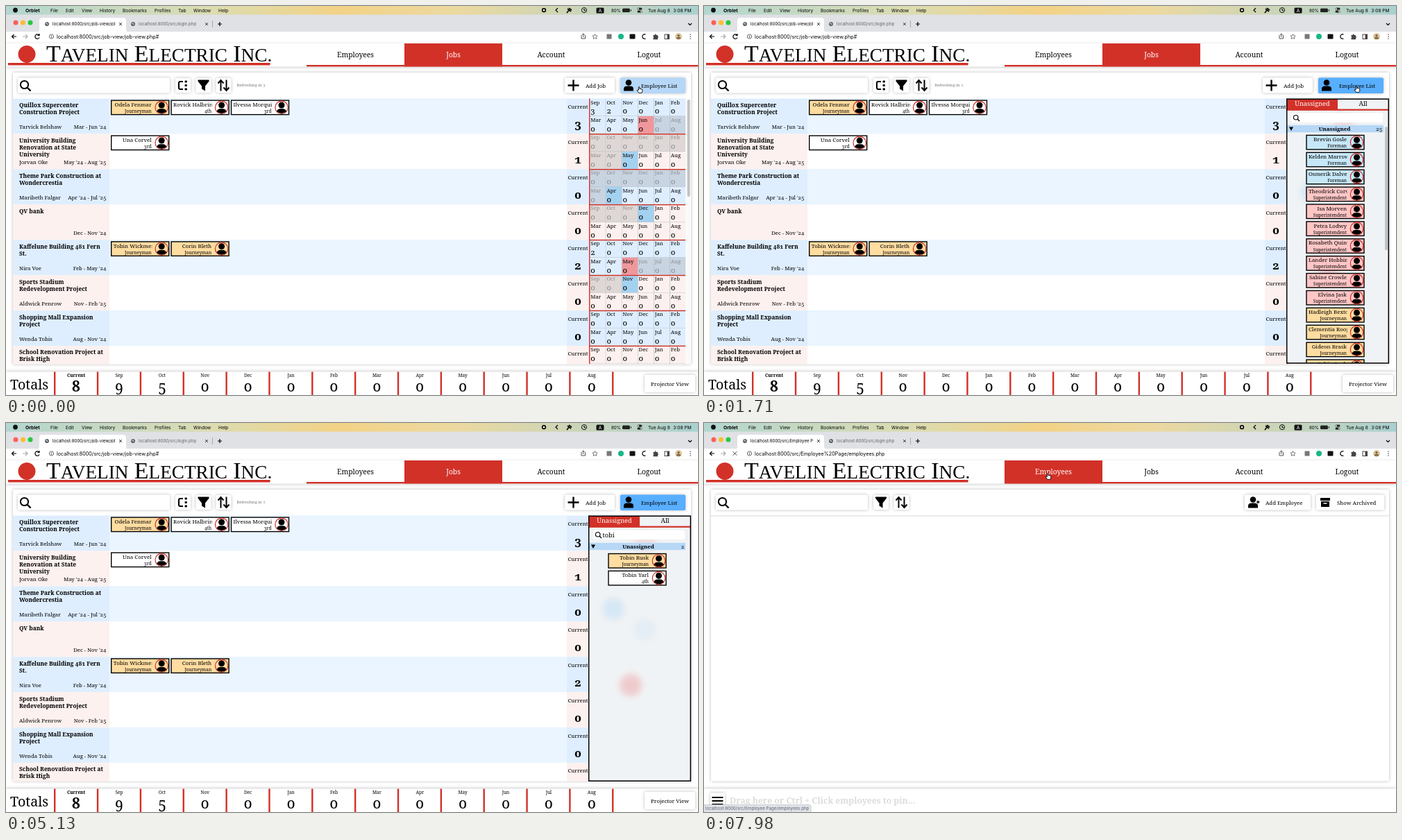
Recreate the animation shown at these times as an HTML page. Size 997 by 561 pixels, loop 8 s.

```html
<!DOCTYPE html>
<html lang="en">
<head>
<meta charset="utf-8">
<title>Job board</title>
<style>
html, body { margin: 0; width: 100%; height: 100%; overflow: hidden; background: #fff; }
svg { display: block; }
#stage { width: 100vw; height: 100vh; }
text { font-family: "Noto Serif", serif; font-variant-numeric: oldstyle-nums; white-space: pre; }
.sans { font-family: Inter, sans-serif; font-variant-numeric: normal; }
.title { font-family: "Liberation Serif", serif; }
.bold { font-weight: 700; }
.mid { text-anchor: middle; }
.end { text-anchor: end; }
.white { fill: #fff; }
.dim { fill: #8b8f93; }
.soft { fill: #5f6368; }
.pale { fill: #dcdcdc; }
.lift { filter: drop-shadow(0 0 2px #0004); }
.line { fill: none; stroke: #000; stroke-width: 1.2; }
</style>
</head>
<body>
<svg id="stage" viewBox="0 0 997 561"></svg>
<script>
const LOOP = 8000;
const RED = '#d23128';
const MONTHS = 'Sep Oct Nov Dec Jan Feb Mar Apr May Jun Jul Aug'.split(' ');
const ROLES = ['Foreman', 'Superintendent', 'Journeyman', '4th', '3rd'];
const ROLE_FILL = { Foreman: '#c6e7f7', Superintendent: '#ffc6c6', Journeyman: '#ffdca0' };
const ROW = 50.95, ROWS_TOP = 133.5;

const JOBS = [
  { title: ['Quillox Supercenter', 'Construction Project'], lead: 'Tarvick Belshaw', span: "Mar - Jun '24", last: 9, need: [3, 2],
    crew: [['Odela Fenmar', 'Journeyman'], ['Rovick Halbrine', '4th'], ['Ilvessa Morquin', '3rd']] },
  { title: ['University Building', 'Renovation at State', 'University'], lead: 'Jorvan Oke', span: "May '24 - Aug '25", first: 8,
    crew: [['Una Corvel', '3rd']] },
  { title: ['Theme Park Construction at', 'Wondercrestia'], lead: 'Maribeth Falgar', span: "Apr '24 - Jul '25", first: 7 },
  { title: ['QV bank'], lead: '', span: "Dec - Nov '24", first: 3 },
  { title: ['Kaffelune Building 481 Fern', 'St.'], lead: 'Nira Voe', span: "Feb - May '24", last: 8, need: [2],
    crew: [['Tobin Wickmere', 'Journeyman'], ['Corin Bleth', 'Journeyman']] },
  { title: ['Sports Stadium', 'Redevelopment Project'], lead: 'Aldwick Penrow', span: "Nov - Feb '25", first: 2 },
  { title: ['Shopping Mall Expansion', 'Project'], lead: 'Wenda Tobis', span: "Aug - Nov '24" },
  { title: ['School Renovation Project at', 'Brisk High'], lead: '', span: '' }
];
const FREE = [
  ['Foreman', 'Brevin Gosle,Kelden Marrow,Osmerik Dalvey'],
  ['Superintendent', 'Theodrick Corvins,Isa Morven,Petra Lodwy,Rosabeth Quintlow,Lander Hobbin,Sabine Crowle,Elvina Jask'],
  ['Journeyman', 'Hadleigh Bexton,Clementia Roop,Gideon Brask,Tobin Rusk,Merla Sandry,Orrin Fosk'],
  ['4th', 'Tobin Yarl,Ansel Dunrow,Britta Keel,Hollis Marn,Linnet Gorse'],
  ['3rd', 'Perrin Stoke,Selda Warrick,Tamsy Orle,Yorick Plend']
].flatMap(([role, names]) => names.split(',').map(name => [name, role]));
const ACTIVE = [...FREE, ...JOBS.flatMap(job => job.crew || [])].sort((a, b) =>
  ROLES.indexOf(a[1]) - ROLES.indexOf(b[1]) || a[0].localeCompare(b[0]));
const INACTIVE = [['Wenda Tobis', 'Superintendent']];

const text = (x, y, s, size, cls = '') => `<text x="${x}" y="${y}" font-size="${size}" class="${cls}">${s}</text>`;
const rect = (x, y, w, h, fill, more = '') => `<rect x="${x}" y="${y}" width="${w}" height="${h}" fill="${fill}" ${more}/>`;
const circle = (x, y, r, fill, more = '') => `<circle cx="${x}" cy="${y}" r="${r}" fill="${fill}" ${more}/>`;
const path = (d, more = 'class="line"') => `<path d="${d}" ${more}/>`;
const at = (x, y, body, scale = 1) => `<g transform="translate(${x} ${y}) scale(${scale})">${body}</g>`;
const group = (id, body, more = '') => `<g id="${id}" ${more}>${body}</g>`;
const box = (x, y, w, h, fill = '#fff') => rect(x, y, w, h, fill, 'rx="2" class="lift"');
const each = (list, draw) => list.map(draw).join('');

const ICONS = {
  search: circle(-1, -1, 5.6, 'none', 'stroke="#000" stroke-width="2"') + path('M3 3L8 8', 'stroke="#000" stroke-width="2.4"'),
  filter: path('M-8 -8H8V-6L2.5 1V8L-2.5 5V1L-8 -6Z', ''),
  sort: path('M-4 8V-7M-8 -3L-4 -7.5L0 -3M4 -8V7M0 3L4 7.5L8 3', 'fill="none" stroke="#000" stroke-width="2"'),
  tree: path('M0 -5.5H-4Q-6 -5.5 -6 -3.5V3.5Q-6 5.5 -4 5.5H0', 'fill="none" stroke="#000" stroke-width="2"') +
    each([-5.5, 0, 5.5], y => rect(2.5, y - 1.6, 3.4, 3.2, '#000', 'rx="1"')),
  plus: path('M-8 0H8M0 -8V8', 'stroke="#000" stroke-width="2.4"'),
  person: circle(0, -4, 4.3, '#000') + path('M-7 8V5Q-7 1 -2 1H2Q7 1 7 5V8Z', ''),
  archive: rect(-7, -6, 14, 4, '#000') + path('M-6 -1H6V7H-6Z', '') + rect(-2.5, 1, 5, 1.5, '#fff')
};
const icon = (name, x, y, scale) => at(x, y, ICONS[name], scale);
const iconButton = (name, x) => box(x - 11, 104, 22, 21) + icon(name, x, 114.5);

const pen = document.createElement('canvas').getContext('2d');
pen.font = '7.9px "Noto Serif", serif';

function card(x, y, [name, role]) {
  const fits = pen.measureText(name).width <= 56;
  return rect(x, y, 83, 20.5, ROLE_FILL[role] || '#fff', 'stroke="#000" stroke-width="1.4"') +
    `<svg x="${x + 2}" y="${y}" width="56.5" height="21">` +
    text(fits ? 56 : 1, 8.7, name, 7.9, fits ? 'end' : '') + text(56, 17.8, role, 6.5, 'end') + '</svg>' +
    at(x + 72.5, y + 10.2, circle(0, 0, 9.2, 'none', `stroke="${RED}" stroke-width="1.2"`) + circle(0, -3.3, 4.5, '#000') +
      path('M-7 5.8Q-6 2 -2 2H2Q6 2 7 5.8Q0 11.5 -7 5.8Z', ''));
}

function monthCell(job, i, top, base) {
  const x = 841.3 + (i % 6) * 23.1, y = top + (i > 5 ? 25.5 : 0);
  const { first = -1, last = 12, need = [] } = job;
  const off = i < first || i > last;
  const fill = i === first ? '#a3d1f0' : i === last ? '#ef979b' : base;
  return rect(x, y, 23.1, 25.5, fill) + (off ? rect(x, y, 23.1, 25.5, '#808080', 'opacity=".24"') : '') +
    rect(x + 22.5, y, 0.8, 25.5, '#b0b7bf') + rect(x, y + 25, 23.1, 0.6, '#b7bec6') +
    text(x + 1, y + 8, MONTHS[i], 7.7, off ? 'dim' : '') + text(x + 1, y + 21.8, need[i] || 0, 11.3, off ? 'dim' : '');
}

function jobRow(job, i) {
  const y = ROWS_TOP + i * ROW, blue = i % 2 === 0, side = blue ? '#deeeff' : '#fcf1ef';
  const crew = job.crew || [];
  return rect(10, y, 969, 51, side) + rect(149, y, 659, 51, blue ? '#eaf5ff' : '#fff') +
    each(job.title, (line, k) => text(19, y + 12.3 + k * 10, line, 8.3, 'bold')) +
    text(19, y + 43.6, job.lead, 7.8) + text(144.5, y + 43.6, job.span, 7.7, 'end') +
    each(crew, (person, k) => card(151.7 + k * 86.4, y + 2.6, person)) +
    text(824, y + 14.3, 'Current', 7.8, 'mid') + text(824, y + 42.3, crew.length, 17, 'mid bold') +
    each(MONTHS, (_, k) => monthCell(job, k, y, side)) + (i ? rect(841, y - 0.4, 138, 1.4, RED) : '');
}

function browser() {
  const menu = [['File', 64], ['Edit', 86], ['View', 109], ['History', 135], ['Bookmarks', 168], ['Profiles', 214], ['Tab', 248], ['Window', 270], ['Help', 306]];
  const globe = (x) => circle(x, 26, 3, '#5f6368') + path(`M${x - 2} 25h2l1 2`, 'fill="none" stroke="#fff" stroke-width=".8"');
  const cross = (x, y, r) => path(`M${x - r} ${y - r}l${2 * r} ${2 * r}m0 ${-2 * r}l${-2 * r} ${2 * r}`, 'stroke="#444" stroke-width="1"');
  return rect(0, 0, 997, 13, 'url(#sky)') + circle(13.5, 6, 3.4, '#111') + text(28, 8.5, 'Orblet', 6.8, 'sans bold') +
    each(menu, ([s, x]) => text(x, 8.5, s, 6.6, 'sans')) +
    circle(775, 6, 3.2, '#111') + rect(773.8, 4.8, 2.4, 2.4, '#fff') + path('M795 3l-3 3l3 3') +
    path('M808 10l3 -4M809 4l5 4M811 3l4 3', 'stroke="#111" stroke-width="1.8"') +
    circle(833, 6, 3.6, 'none', 'stroke="#111"') + path('M833 4v2l2 1') +
    rect(850.5, 2.5, 11, 8, '#111', 'rx="1.5"') + text(856, 9, 'A', 6.6, 'sans mid white') +
    text(872, 8.5, '80%', 6.2, 'sans') + rect(888, 3.5, 11, 5.5, '#222', 'rx="1.5"') + rect(900, 5, 1, 2.5, '#222') +
    each([4, 8], y => rect(909.5, y - 1.5, 7, 3, '#222', 'rx="1.5"') + circle(y === 4 ? 911 : 915, y, 0.9, '#fff')) +
    text(925, 8.5, 'Tue Aug 8', 6.6, 'sans') + text(987.5, 8.5, '3:08 PM', 6.6, 'sans end') +
    rect(0, 12.5, 997, 25, '#dfe1e5') + each(['#ff5f57', '#febc2e', '#28c840'], (c, i) => circle(14 + i * 10.5, 24, 3.5, c)) +
    path('M44 38Q48 38 48 33V21Q48 17 52 17H169Q173 17 173 21V33Q173 38 177 38Z', 'fill="#fff"') +
    globe(59) + globe(183) + `<svg x="67" y="18" width="90" height="16"><text id="tab" y="10.3" font-size="6.1" class="sans"></text></svg>` +
    text(191, 28.3, 'localhost:8000/src/login.php', 6.1, 'sans soft') + cross(165, 26, 2) + cross(289, 26, 2) +
    rect(297, 21, 0.8, 10, '#999') + path('M305 26h6M308 23v6') + path('M983 25l2.5 2.5l2.5 -2.5') +
    rect(0, 37, 997, 17, '#fff') + path('M15 44H8.5M11.5 41l-3 3l3 3') +
    path('M24 44h7M28 41l3 3l-3 3', 'fill="none" stroke="#aaa" stroke-width="1.2"') +
    group('reload', path('M47.5 42A3.2 3.2 0 1 0 48 45.5M48 40v2.5h-2.5')) + group('stop', cross(44.5, 44, 2.8)) +
    circle(65.5, 44, 3.1, 'none', 'stroke="#555" stroke-width=".9"') + path('M65.5 43.5v2.3M65.5 42v.7', 'stroke="#555"') +
    '<text id="url" x="73" y="46.7" font-size="7.2" class="sans"></text>' +
    path('M829 42v5h5.5v-5M831.8 45v-5M830 41.8l1.8 -2l1.8 2', 'fill="none" stroke="#555"') +
    path('M848.5 40.5l1.1 2.3l2.5 .3l-1.8 1.7l.5 2.5l-2.3 -1.2l-2.3 1.2l.5 -2.5l-1.8 -1.7l2.5 -.3Z', 'fill="none" stroke="#555" stroke-width=".8"') +
    rect(865.5, 40.5, 7, 7, '#777') + circle(886, 44, 4, '#19b687') + rect(898.5, 40.5, 8, 7, '#111', 'rx="1"') +
    path('M921.5 41A3.3 3.3 0 1 0 921.5 47') + path('M932.5 42h2q1 -3.5 2.5 0h2v2q2 1 0 2.2v2h-6.5v-2q1.7 -1.2 0 -2.2Z', 'fill="#444"') +
    rect(949, 41, 6.5, 6.5, 'none', 'stroke="#444"') + rect(952.5, 41, 3, 6.5, '#444') +
    circle(969, 44, 5, '#dfc9a0') + circle(969, 42.7, 1.7, '#7a6242') + rect(966, 45, 6, 2.4, '#7a6242', 'rx="1.2"') +
    each([41, 44, 47], y => circle(986, y, 0.8, '#444'));
}

function header() {
  const brand = each(['Tavelin', 'Electric', 'Inc.'], (word, i) =>
    `${i ? ' ' : ''}${word[0]}<tspan font-size="27.2">${word.slice(1).toUpperCase()}</tspan>`);
  return rect(0, 54, 997, 33.5, '#fff', 'style="filter:drop-shadow(0 1px 2px #0003)"') +
    circle(30, 69.5, 12.5, RED) + text(58, 80, brand, 33.9, 'title') + rect(3, 82, 377.5, 3.5, RED) +
    rect(433, 85, 564, 2.4, RED) + '<rect id="current" y="54" width="141" height="33.3" fill="' + RED + '"/>' +
    each(['Employees', 'Jobs', 'Account', 'Logout'], (s, i) => text(503.5 + i * 141, 74, s, 10.3, 'mid nav'));
}

function jobsPage() {
  const totals = [8, 9, 5];
  return iconButton('tree', 255) + iconButton('filter', 284.5) + iconButton('sort', 313.5) +
    '<text id="refresh" x="332.5" y="116.3" font-size="5.7" fill="#777"></text>' +
    box(805, 103.5, 72, 22) + icon('plus', 817.5, 114.5) + text(835, 117.5, 'Add Job', 7.8) +
    box(885, 103.5, 94, 22.5, '#b6d7f8') + rect(885, 103.5, 94, 22.5, '#58aeff', 'rx="2" id="pressed"') +
    icon('person', 897, 114.5) + text(915, 117.5, 'Employee List', 7.8) +
    `<g clip-path="url(#sheet)">${each(JOBS, jobRow)}${rect(840, ROWS_TOP, 1.4, 383, RED)}${rect(979, ROWS_TOP, 8, 383, '#fafafa')}${rect(981.5, 135, 4, 140, '#c1c1c1', 'rx="2"')}</g>` +
    text(6, 553, 'Totals', 19.6) +
    each(['Current', ...MONTHS], (s, i) => {
      const x = 101 + i * 61.9, cls = i ? 'mid' : 'mid bold';
      return text(x, 534.5, s, 6.5, cls) + text(x, 556, totals[i] || 0, 21, cls);
    }) +
    each([...Array(14).keys()], i => rect(69 + i * 61.85, 527.5, 2.4, 34, RED)) +
    box(920, 532, 73, 25) + text(956.5, 547.6, 'Projector View', 7.8, 'mid');
}

function staffPage() {
  return iconButton('filter', 255) + iconButton('sort', 284.5) + rect(10, 133, 977, 1.6, '#e6e6e6') +
    box(779, 103.5, 95, 22) + icon('person', 791, 114.5) + path('M796 114h4.5M798.2 111.8v4.5', 'stroke="#000" stroke-width="1.4"') +
    text(809, 117.5, 'Add Employee', 7.8) + box(882, 103.5, 98, 22) + icon('archive', 895, 114) + text(912, 117.5, 'Show Archived', 7.8) +
    box(9, 533.5, 21, 24) + each([539, 544, 549], y => rect(11.5, y, 16, 2, '#000')) +
    text(37, 549, 'Drag here or Ctrl + Click employees to pin...', 12.2, 'bold pale');
}

function panelBody(query, tab) {
  const match = ([name]) => name.toLowerCase().includes(query);
  const all = tab === 'All';
  const sections = all ? [['Active', ACTIVE.filter(match)], ['Inactive', INACTIVE.filter(match)]] : [['Unassigned', FREE.filter(match)]];
  const scrolls = sections.reduce((n, s) => n + s[1].length, 0) > 12;
  let y = scrolls ? 177 : 178;
  const list = each(sections, ([label, people]) => {
    const top = y + (scrolls ? 9.4 : 10.5);
    const out = rect(840, y - 5.2, 139, 10.4, '#b6d7f6') + path(`M843 ${y - 2.5}h6l-3 5.5Z`, '') +
      text(scrolls ? 908.5 : 911, y + 2.8, label, 7.9, 'bold mid') + text(977, y + 2.8, people.length, 7.5, 'end') +
      each(people, (p, i) => card(868, top + i * 24.9, p));
    y += 16 + people.length * 25;
    return out;
  });
  const blot = (x, py, color, o) => circle(x, py, 16, color, `opacity="${o}" filter="url(#blur)"`);
  return rect(840, 134, 147, 382, '#f0f3f5') + blot(875, 268, '#9ccdf5', 0.3) + blot(900, 378, '#ee8f8f', 0.4) +
    blot(921, 170, '#ee8f8f', 0.2) + blot(920, 298, '#9ccdf5', 0.15) +
    rect(all ? 913 : 840, 134, all ? 74 : 73, 15, RED) + rect(840, 148.6, 147, 2.2, RED) +
    text(876.5, 144.3, 'Unassigned', 9.2, all ? 'mid' : 'mid white') + text(949.5, 144.3, 'All', 9.2, all ? 'mid white' : 'mid') +
    rect(846, 154.5, 132, 13.5, '#fff', 'rx="3"') + icon('search', 853.3, 161.3, 0.58) +
    text(859.5, 165.3, query, 9.2) + list;
}

const CURSORS = {
  arrow: path('M-1.5 -4.5V4L.4 2.3L1.7 5L3 4.4L1.8 1.8H4.2Z', 'fill="#000" stroke="#fff" stroke-width=".7"'),
  hand: path('M-1.6 .5V-4Q-.8 -5.3 0 -4V-1.4Q2 -2 3.8 -.6Q4.4 2.5 2.8 4.4H-1.2L-3.8 .8Q-3.4 -.8 -1.6 .5Z', 'fill="#fff" stroke="#000" stroke-width=".9"'),
  beam: path('M-1.8 -4.2Q0 -4.2 0 -3V3Q0 4.2 -1.8 4.2M1.8 -4.2Q0 -4.2 0 -3M0 3Q0 4.2 1.8 4.2', 'fill="none" stroke="#222" stroke-width=".9"')
};

const stage = document.getElementById('stage');
stage.innerHTML = `<defs>
  <linearGradient id="sky">${each([[0, '#b2d6d0'], [0.3, '#dcdcb0'], [0.48, '#f3d286'], [0.65, '#ecd9a0'], [1, '#a9d0cf']], ([o, c]) => `<stop offset="${o}" stop-color="${c}"/>`)}</linearGradient>
  <filter id="blur" x="-1" y="-1" width="3" height="3"><feGaussianBlur stdDeviation="5"/></filter>
  <clipPath id="sheet">${rect(10, 96, 977, 420.5, '#000')}</clipPath>
  <clipPath id="unroll">${rect(839, 133, 149, 0, '#000', 'id="opening"')}</clipPath></defs>` +
  rect(0, 0, 997, 561, '#fff') + browser() + header() + rect(10, 96, 977, 420.5, '#fff', 'class="lift"') +
  rect(0, 527.5, 997, 34, '#fff', 'style="filter:drop-shadow(0 -1px 2px #0003)"') +
  box(17, 103.5, 219, 22) + icon('search', 27.5, 114.5) + group('jobs', jobsPage()) + group('staff', staffPage()) +
  group('panel', group('list', '', 'clip-path="url(#unroll)"') + rect(981, 174, 4, 0, '#bfc3c6', 'rx="2" id="thumb"') +
    rect(839.7, 134.2, 146.6, 0, 'none', 'stroke="#000" stroke-width="1.5" id="frame"')) +
  group('status', path('M0 550H999', 'id="plate" fill="#dfe3e9" stroke="#bbb" stroke-width=".6"') +
    '<text id="link" x="2" y="558" font-size="6.2" class="sans soft"></text>') +
  group('cursor', '');

const $ = id => document.getElementById(id);
const show = (id, on) => $(id).setAttribute('visibility', on ? 'visible' : 'hidden');
const set = (id, values) => Object.entries(values).forEach(([k, v]) => $(id).setAttribute(k, v));
const clamp = v => Math.min(1, Math.max(0, v));
const smooth = v => v * v * (3 - 2 * v);
const latest = (steps, t) => steps.reduce((value, [time, next]) => t >= time ? next : value, steps[0][1]);

const OPEN = 1100, OPEN_TIME = 715, PICK_ALL = 6350, LOAD = 7800;
const MOVES = [[0, 913, 121], [200, 913, 121], [800, 941, 120], [1700, 941, 120], [2500, 887, 161], [5500, 887, 161], [6150, 961, 144], [6560, 961, 144], [7350, 497, 113], [7480, 497, 113], [7650, 496, 77], [LOOP, 496, 77]];
const SHAPES = [[0, 'hand'], [1900, 'arrow'], [2350, 'beam'], [3400, ''], [5500, 'beam'], [5650, 'arrow'], [6000, 'hand'], [6620, 'arrow'], [7570, 'hand']];
const TYPED = [[0, ''], [3600, 't'], [3850, 'to'], [4150, 'tob'], [4400, 'tobi']];
const LINKS = [[0, ''], [6050, 'job-view/job-view.php#'], [7600, 'Employee Page/employees.php']];

function cursorAt(t) {
  const i = Math.max(1, MOVES.findIndex(m => m[0] > t));
  const [t0, x0, y0] = MOVES[i - 1], [t1, x1, y1] = MOVES[i];
  const k = smooth(clamp((t - t0) / (t1 - t0)));
  return `translate(${x0 + (x1 - x0) * k} ${y0 + (y1 - y0) * k})`;
}

let drawn = '', shape = null;
function render(t) {
  const loaded = t >= LOAD;
  show('jobs', !loaded); show('staff', loaded);
  show('reload', !loaded); show('stop', loaded);
  set('current', { x: loaded ? 433 : 574 });
  document.querySelectorAll('.nav').forEach((el, i) => el.classList.toggle('white', i === (loaded ? 0 : 1)));
  $('tab').textContent = 'localhost:8000/src/' + (loaded ? 'Employee Page' : 'job-view/job-view');
  $('url').textContent = 'localhost:8000/src/' + (loaded ? 'Employee%20Page/employees.php' : 'job-view/job-view.php#');

  const tick = Math.floor((t - 80) / 900);
  $('refresh').textContent = 'Refreshing in ' + (tick < 2 ? 2 - tick : 12 - tick);
  set('pressed', { opacity: clamp((t - OPEN) / 150) });

  const query = latest(TYPED, t), tab = t >= PICK_ALL ? 'All' : 'Unassigned';
  if (drawn !== query + tab) $('list').innerHTML = panelBody(query, tab);
  drawn = query + tab;
  const height = 382 * (1 - (1 - clamp((t - OPEN) / OPEN_TIME)) ** 3);
  const view = Math.max(0, height - 41);
  show('panel', t > OPEN && !loaded);
  set('opening', { height: height + 1 });
  set('frame', { height });
  set('thumb', { height: query ? 0 : view * view / 648 });

  const link = latest(LINKS, t), width = t >= 7600 ? 154 : 132;
  show('status', link !== '');
  $('link').textContent = 'localhost:8000/src/' + link;
  set('plate', { d: `M-1 550.5H${width - 3}Q${width} 550.5 ${width} 553V562H-1Z` });

  const next = latest(SHAPES, t);
  if (next !== shape) $('cursor').innerHTML = CURSORS[shape = next] || '';
  set('cursor', { transform: cursorAt(t) });
}

const start = performance.now();
function loop() {
  render((performance.now() - start) % LOOP);
  requestAnimationFrame(loop);
}
loop();
</script>
</body>
</html>
```
